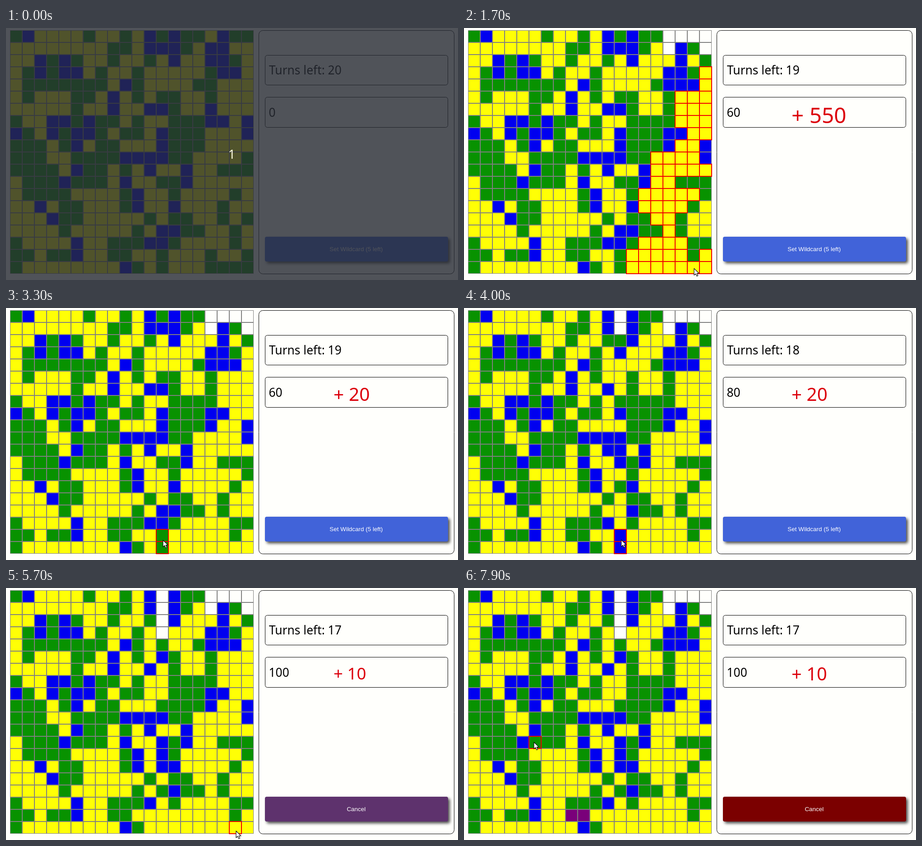
An HTML page with a canvas for the animation above (8 s loop, 1002 px wide and 559 px high).

```html
<!DOCTYPE html>
<html lang="en">
<head>
<meta charset="utf-8">
<title>Colour blocks</title>
<style>
  html, body { margin: 0; width: 100%; height: 100%; overflow: hidden; background: #fffffc; }
  canvas { display: block; }
</style>
</head>
<body>
<canvas id="stage" width="1002" height="559"></canvas>
<script>
const ctx = document.getElementById('stage').getContext('2d');

const SIZE = 20, CELL = 27, LEFT = 9, TOP = 5;
const STEP = 100, STEPS = 80;
const SANS = '"Noto Sans", "Open Sans", sans-serif';
const ARIAL = '"Liberation Sans", Arial, sans-serif';
const PAPER = '#fffffc';
const COLORS = { Y: '#ffff05', G: '#089200', B: '#0000f0', W: '#7a007a', ' ': PAPER };
const BLUE = [65, 99, 217], DARK_RED = [123, 0, 0];

const LEVEL = [
  'GBYYYYGYYGYBGBGGYBGG',
  'YYYYYYYYGGYBBBGYBBYY',
  'YYBGBGYYGYYGYBYYBBGY',
  'YGBGBBYGYYGYYYYYGBBY',
  'YGGGGGGGYBGYYYYGGYYY',
  'YGYYYGGYBYGYGGYYGYYY',
  'YYYYYGYYBYYBBGYYBYYY',
  'GYYBBGBGGYGYYGGGBBYB',
  'BGYBGBBGYGGYBGGGYYYB',
  'GGGYGBYGGYYYBGGGYYYY',
  'GGGYYGGGGBBBBGGYYYYG',
  'GGGGYBGGYGYBYYBYYGGG',
  'YGGGBGGGYBYYGGBYYYYY',
  'YGGGGYYYYGBYYGYYYYGY',
  'YYBYGGYYYGBYYBYYYGYY',
  'YYYBGGYYYYYGYGGYYGYG',
  'YYYYGYYYYYGYBBGGYYGY',
  'GYYYYBYYGGGBBGYYYYGY',
  'GGYGGBYYGGYYGYYYGYYG',
  'GYYYYYYYYBGYGYYYGGGG'
];

// Pointer waypoints: step, x, y
const PATH = [
  [13, 516, 551], [14, 514, 545], [15, 514, 545], [16, 511, 536], [19, 508, 528],
  [22, 438, 537], [23, 414, 547], [25, 383, 548], [26, 372, 541], [27, 363, 531],
  [28, 356, 523], [33, 348, 515], [43, 349, 514], [44, 565, 507], [46, 668, 500],
  [47, 694, 497], [55, 694, 497], [56, 640, 515], [57, 510, 539], [58, 380, 532],
  [59, 270, 512], [61, 264, 508], [65, 254, 506], [66, 245, 505], [70, 241, 503],
  [77, 154, 351], [78, 154, 351], [79, 155, 342]
];
const CLICKS = [17, 35, 42, 55, 61, 68];
const WILD_AT = 55, FADE = 5;

function pointerAt(step) {
  if (step < PATH[0][0]) return null;
  const i = PATH.findIndex(p => p[0] >= step);
  const b = PATH[i], a = PATH[Math.max(0, i - 1)];
  const k = b[0] === a[0] ? 0 : (step - a[0]) / (b[0] - a[0]);
  return { x: a[1] + (b[1] - a[1]) * k, y: a[2] + (b[2] - a[2]) * k };
}

function cellAt(p) {
  if (!p) return null;
  const c = Math.floor((p.x - LEFT) / CELL), r = Math.floor((p.y - TOP) / CELL);
  return c >= 0 && r >= 0 && c < SIZE && r < SIZE ? [c, r] : null;
}

function groupAt(board, [c, r]) {
  const kind = board[r][c], seen = new Set(), todo = [[c, r]], found = [];
  while (todo.length) {
    const [x, y] = todo.pop(), key = y * SIZE + x;
    if (seen.has(key) || !board[y] || board[y][x] !== kind) continue;
    seen.add(key);
    found.push([x, y]);
    todo.push([x + 1, y], [x - 1, y], [x, y + 1], [x, y - 1]);
  }
  return found;
}

function removeGroup(board, group) {
  for (const [c, r] of group) board[r][c] = null;
  for (let c = 0; c < SIZE; c++) {
    const kept = board.map(row => row[c]).filter(Boolean);
    const gap = SIZE - kept.length;
    board.forEach((row, r) => { row[c] = r < gap ? ' ' : kept[r - gap]; });
  }
}

// Plays the whole session once and keeps a snapshot per step
function play() {
  const board = LEVEL.map(row => [...row]);
  let turns = 20, score = 0, size = 0;
  const states = [];
  for (let step = 0; step < STEPS; step++) {
    const pointer = pointerAt(step), cell = cellAt(pointer), wild = step >= WILD_AT;
    const pick = () => {
      if (!cell || ' W'.includes(board[cell[1]][cell[0]])) return [];
      return wild ? [cell] : groupAt(board, cell);
    };
    let hover = pick();
    if (CLICKS.includes(step) && hover.length) {
      if (wild) {
        board[cell[1]][cell[0]] = 'W';
      } else {
        removeGroup(board, hover);
        score += hover.length * 10;
        turns--;
      }
      hover = pick();
    }
    const points = hover.length * 10;
    if (!points) size = 0;
    else size = size ? size + (39.5 + points * 0.045 - size) * 0.4 : 36.7;
    states.push({ step, board: board.map(row => [...row]), turns, score, pointer, hover, points, size });
  }
  states[78] = states[77];
  return states;
}

function text(str, x, y, font, color, align = 'left') {
  ctx.font = font;
  ctx.fillStyle = color;
  ctx.textAlign = align;
  ctx.fillText(str, x, y);
}

function box(x, y, w, h, radius) {
  ctx.beginPath();
  ctx.roundRect(x, y, w, h, radius);
  ctx.strokeStyle = '#000';
  ctx.lineWidth = 1;
  ctx.stroke();
}

function drawBoard({ board, hover }) {
  ctx.fillStyle = '#808080';
  ctx.fillRect(LEFT, TOP, SIZE * CELL, SIZE * CELL);
  board.forEach((row, r) => row.forEach((kind, c) => {
    ctx.fillStyle = COLORS[kind];
    ctx.fillRect(LEFT + c * CELL + 1, TOP + r * CELL + 1, CELL - 2, CELL - 2);
  }));
  ctx.strokeStyle = '#f00000';
  ctx.lineWidth = 2;
  for (const [c, r] of hover) ctx.strokeRect(LEFT + c * CELL, TOP + r * CELL, CELL, CELL);
}

function drawButton(step) {
  const k = Math.min(1, Math.max(0, (step - WILD_AT + 1) / (FADE + 1)));
  const rgb = BLUE.map((v, i) => Math.round(v + (DARK_RED[i] - v) * k));
  ctx.save();
  ctx.shadowColor = 'rgba(0,0,0,.7)';
  ctx.shadowBlur = 6;
  ctx.shadowOffsetX = ctx.shadowOffsetY = 4;
  ctx.fillStyle = `rgb(${rgb})`;
  ctx.beginPath();
  ctx.roundRect(574, 463, 406, 55, 4);
  ctx.fill();
  ctx.restore();
  const label = step < WILD_AT ? 'Set Wildcard (5 left)' : 'Cancel';
  text(label, 776.3, 495, `13.44px ${ARIAL}`, '#fff', 'center');
}

function drawPanel({ step, turns, score, points, size }) {
  box(560.5, 5.5, 433, 540, 9);
  box(574.5, 60.5, 405, 66, 5);
  box(574.5, 153.5, 405, 67, 5);
  text(`Turns left: ${turns}`, 583, 103, `26.4px ${SANS}`, '#000');
  text(score, 582.5, 197, `26.4px ${SANS}`, '#000');
  drawButton(step);
  if (points) text(`+ ${points}`, 726, 177 + size * 0.714, `${size}px ${SANS}`, '#dc000c');
}

const ARROW = new Path2D('M0 0V15L3.6 11.8L6 17.2L8.6 16L6.3 10.9H11Z');
const HAND = new Path2D('M3 1.5Q4 -.5 5.2 1.5V5.5L11 6.8Q12.6 7.4 12.2 9.5L11 14H4.5L.2 9.2Q-.6 7.2 1.4 7.4L3 8.6Z');

function drawPointer({ step, pointer }) {
  if (!pointer) return;
  const hand = step >= 49 && step <= WILD_AT;
  ctx.save();
  ctx.translate(pointer.x, pointer.y);
  ctx.lineJoin = 'round';
  ctx.lineWidth = 1.2;
  ctx.fillStyle = '#fff';
  ctx.strokeStyle = '#111';
  ctx.fill(hand ? HAND : ARROW);
  ctx.stroke(hand ? HAND : ARROW);
  ctx.restore();
}

function drawCountdown() {
  ctx.fillStyle = 'rgba(40,44,52,.81)';
  ctx.fillRect(0, 0, 1002, 559);
  text('1', 500.5, 290, `27px ${SANS}`, '#fffde0', 'center');
}

function draw(state) {
  ctx.fillStyle = PAPER;
  ctx.fillRect(0, 0, 1002, 559);
  drawBoard(state);
  drawPanel(state);
  drawPointer(state);
  if (state.step === 0) drawCountdown();
}

const states = play();
const start = performance.now();

function tick() {
  const t = (performance.now() - start) % (STEP * STEPS);
  draw(states[Math.floor(t / STEP)]);
  requestAnimationFrame(tick);
}
tick();
</script>
</body>
</html>
```
